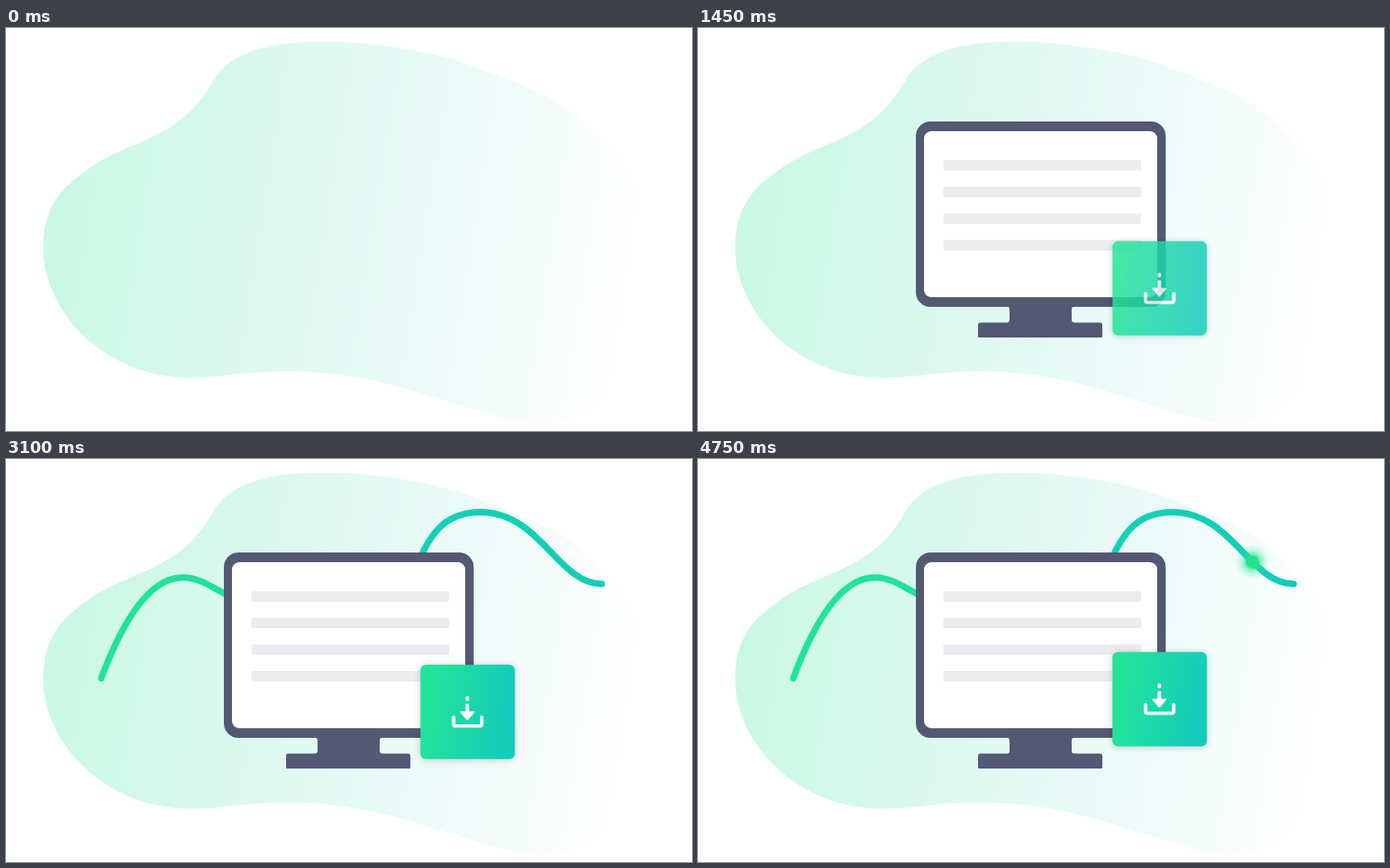
An HTML page that plays this animation: 850 px wide and 500 px high, repeating every 4800 ms.

```html
<!DOCTYPE html>
<html lang="en">
<head>
<meta charset="utf-8">
<title>Download</title>
<style>
  html, body { margin: 0; width: 100%; height: 100%; overflow: hidden; background: #fff; }
  svg { display: block; width: 850px; height: 500px; }
</style>
</head>
<body>
<svg viewBox="0 0 850 500">
  <defs>
    <linearGradient id="mint" gradientUnits="userSpaceOnUse" x1="40" y1="190" x2="790" y2="310">
      <stop offset="0" stop-color="#c7f8e2"/>
      <stop offset=".4" stop-color="#def8f1"/>
      <stop offset=".7" stop-color="#ecfbf9"/>
      <stop offset=".97" stop-color="#fff"/>
    </linearGradient>
    <linearGradient id="teal" x1="0" y1=".42" x2="1" y2=".58">
      <stop offset=".05" stop-color="#22e499"/>
      <stop offset=".95" stop-color="#13ccbb"/>
    </linearGradient>
    <linearGradient id="wave" gradientUnits="userSpaceOnUse" x1="118" y1="0" x2="738" y2="0">
      <stop offset="0" stop-color="#22e499"/>
      <stop offset=".25" stop-color="#20e09f"/>
      <stop offset=".65" stop-color="#14d1b4"/>
      <stop offset="1" stop-color="#13ccbb"/>
    </linearGradient>
    <radialGradient id="glow">
      <stop offset="0" stop-color="#22e48f"/>
      <stop offset=".34" stop-color="#22e48f"/>
      <stop offset=".4" stop-color="#22e48f" stop-opacity=".62"/>
      <stop offset=".65" stop-color="#22e48f" stop-opacity=".25"/>
      <stop offset="1" stop-color="#22e48f" stop-opacity="0"/>
    </radialGradient>
    <filter id="soft" x="-20%" y="-20%" width="140%" height="140%">
      <feGaussianBlur stdDeviation="4"/>
    </filter>
  </defs>

  <path fill="url(#mint)" d="M257 65C275 33 320 17 390 17C460 17 530 30 570 44C610 60 665 78 700 103
    C745 143 790 185 790 260C788 330 775 410 740 455C715 482 690 492 650 491C620 487 590 476 520 455
    C460 436 410 426 345 426C290 427 265 434 230 434C120 434 46 350 46 272C46 235 60 207 85 188
    C130 150 160 150 205 122C235 102 245 85 257 65Z"/>

  <g id="curves" fill="none" stroke="url(#wave)" stroke-width="8" stroke-linecap="round">
    <path id="left" d="M118 272C145 200 178 147 219 147C240 147 255 159 285 175"/>
    <path id="right" d="M495 162C520 110 530 66 588 66C662 66 684 155 738 155"/>
  </g>
  <circle id="dotL" r="22" fill="url(#glow)"/>
  <circle id="dotR" r="22" fill="url(#glow)"/>

  <g id="monitor">
    <g fill="#535873">
      <rect x="270" y="116" width="309.5" height="230" rx="18"/>
      <path d="M383 345.8Q386 346 386 349V362Q386 365.5 382.5 365.5H350Q347 365.5 347 368.5V382.500
        Q347 384 348.500 384H499.5Q501 384 501 382.5V368.5Q501 365.5 498 365.5H466.500
        Q463 365.5 463 362V349Q463 346 466 345.8Z"/>
    </g>
    <rect x="280" y="128" width="289" height="206" rx="9" fill="#fff"/>
    <g fill="#ebecf0">
      <rect x="304" y="164" width="245" height="13" rx="2"/>
      <rect x="304" y="197" width="245" height="13" rx="2"/>
      <rect x="304" y="230" width="245" height="13" rx="2"/>
      <rect x="304" y="263" width="245" height="13" rx="2"/>
    </g>
  </g>

  <g id="card">
    <rect x="513.5" y="1" width="117" height="117" rx="7" opacity=".2" filter="url(#soft)"/>
    <rect x="513.5" width="117" height="117" rx="7" fill="url(#teal)"/>
    <g fill="#fff">
      <rect x="569.4" y="39" width="4.4" height="6" rx="2"/>
      <rect x="569.4" y="48.500" width="4.4" height="11" rx="1"/>
      <path d="M563 58H580.200Q581 58.300 580.400 59.300L572.400 68.500Q571.600 69.300 570.800 68.500L562.800 59.300Q562.300 58.300 563 58Z"/>
    </g>
    <path d="M554.6 65.2V73.500Q554.6 76 557.1 76H587Q589.5 76 589.5 73.500V65.2"
      fill="none" stroke="#fff" stroke-width="4.2" stroke-linecap="round"/>
  </g>
</svg>
<script>
const LOOP = 4800, STEP = 50;
const $ = id => document.getElementById(id);
const curves = $('curves'), monitor = $('monitor'), card = $('card');

// Linear interpolation through [time, value] pairs, held at both ends.
function track(keys, t) {
  if (t <= keys[0][0]) return keys[0][1];
  for (let i = 1; i < keys.length; i++) {
    const [a, from] = keys[i - 1], [b, to] = keys[i];
    if (t < b) return from + (to - from) * (t - a) / (b - a);
  }
  return keys[keys.length - 1][1];
}

const fade = (t, start, end) => track([[start, 0], [end, 1]], t);

const cardY = [[950, 214.5], [1550, 274.5], [2650, 239.5], [3650, 274.5], [4750, 239.5]];

function place(el, y, opacity) {
  el.setAttribute('transform', `translate(0 ${y})`);
  el.setAttribute('opacity', opacity);
}

function ride(dot, path, distance, opacity) {
  const p = path.getPointAtLength(distance);
  dot.setAttribute('cx', p.x);
  dot.setAttribute('cy', p.y);
  dot.setAttribute('opacity', opacity);
}

function draw(t) {
  const screen = fade(t, 0, 1200), lines = fade(t, 1485, 2110);
  place(monitor, -100 * (1 - screen), screen);
  place(curves, -60 * (1 - lines), lines);
  place(card, track(cardY, t), fade(t, 950, 1550));

  const leftRun = Math.max(0, 130 + .312 * (t - 2500));
  const rightTime = Math.max(0, t - 3840) / 1000;
  ride($('dotL'), $('left'), leftRun, t < 3000 ? fade(t, 2100, 2250) : 0);
  ride($('dotR'), $('right'), 50 + 259 * rightTime ** 2, fade(t, 3800, 3900));
}

const begin = performance.now();
function tick() {
  const t = (performance.now() - begin + 2) % LOOP;
  draw(t < 2 * STEP ? 0 : Math.floor(t / STEP) * STEP);
  requestAnimationFrame(tick);
}
tick();
</script>
</body>
</html>
```
